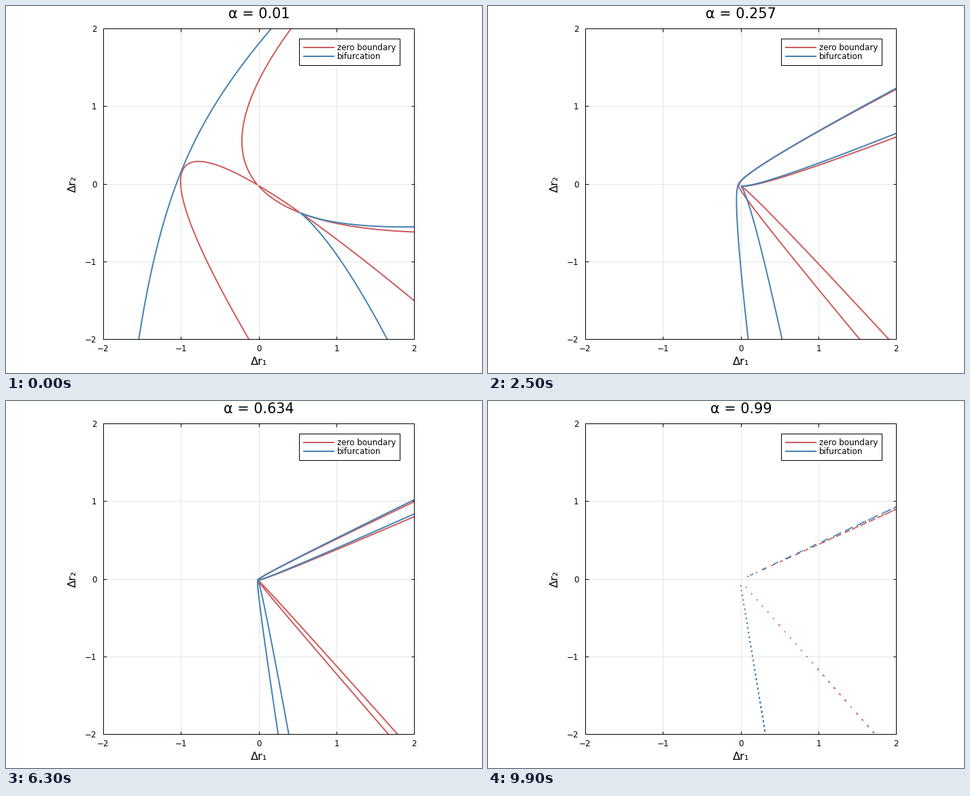
Animation of 700x540 px, one loop 10 s. Source, as a matplotlib script:

```python
import numpy as np
import matplotlib.pyplot as plt
from matplotlib.animation import FuncAnimation
from matplotlib.collections import LineCollection
from matplotlib.lines import Line2D
from matplotlib.patches import Rectangle

W, H, DPI = 700, 540, 100
FRAMES = 100
PX = 72 / DPI  # points per pixel
RED, BLUE = "indianred", "steelblue"

plt.rcParams["font.family"] = "DejaVu Sans"
plt.rcParams["path.simplify"] = False

# Growth rates r = (1 - a) A x + a Q(x): every curve scales with (1 - a)^2 / a
ORIGIN = (-0.0124, -0.0163)
axis = np.linspace(-2, 2, 401)
R1, R2 = np.meshgrid(axis - ORIGIN[0], axis - ORIGIN[1])

# Parabolas x2 = 0 and x1 = 0: (axis slope, linear term, quadratic term)
PARABOLAS = [(0.453, -0.6184, 45.94), (-1.1405, 1.8219, 81.92)]

# Fold curve, in coordinates along its two limiting rays
U = R1 + R2 / 6
V = 0.468 * R1 - R2
U0, V0 = 0.0186, 0.0214
M12, M21 = -0.10167, -0.1345
FOLD = (2 * M12 ** 2 * M21) ** 2


def zero_boundary(g):
    out = 1.0
    for slope, p, q in PARABOLAS:
        w = R2 - slope * R1
        out = out * (q / g * w * w + p * w - R1)
    return out


def bifurcation(g):
    """Discriminant of the quartic for the equilibria."""
    x = 4 * U / g + U0
    z = 4 * M12 ** 2 * (4 * V / g + V0)
    x2, z2 = x * x, z * z
    return x2 * z2 - z2 * z - 16 * FOLD * x2 * x + 18 * FOLD * x * z - 27 * FOLD ** 2


fig = plt.figure(figsize=(W / DPI, H / DPI), dpi=DPI, facecolor="white")


def label(x, y, text, size, **kw):
    return fig.text(x / W, 1 - y / H, text, fontsize=size * PX, **kw)


ax = fig.add_axes([143 / W, (H - 490.3) / H, 457.4 / W, 457.3 / H])
ax.set(xlim=(-2, 2), ylim=(-2, 2))
ax.set_autoscale_on(False)
ticks = range(-2, 3)
ax.set_xticks(ticks)
ax.set_yticks(ticks)
ax.set_axisbelow(True)
ax.grid(color="black", alpha=0.1, lw=PX)
ax.tick_params(direction="in", length=4.5 * PX, width=PX, top=True, right=True,
               labelsize=11.87 * PX)
ax.tick_params(axis="x", pad=7.4 * PX)
ax.tick_params(axis="y", pad=9.5 * PX)
for spine in ax.spines.values():
    spine.set_linewidth(PX)

title = label(372, 18, "", 20.75, ha="center", va="baseline")
label(372, 528.5, "Δr₁", 16.3, ha="center", va="baseline")
label(103, 262, "Δr₂", 16.3, ha="center", va="baseline", rotation=90,
      rotation_mode="anchor")

# Legend, laid out in pixels from the top left
legend = dict(transform=None, zorder=6)
ax.add_artist(Rectangle((431, H - 87), 148, 39, fc="white", ec="black",
                        lw=PX, **legend))
for y, color, name in [(61, RED, "zero boundary"), (74, BLUE, "bifurcation")]:
    ax.add_artist(Line2D([438, 482], [H - y, H - y], color=color, lw=2 * PX, **legend))
    label(487, y + 4.3, name, 11.87, va="baseline", zorder=7)

curves = [ax.add_collection(LineCollection([], colors=color, linewidths=2 * PX,
                                           capstyle="round", joinstyle="round"),
                            autolim=False)
          for color in (RED, BLUE)]


def zero_set(values):
    # Open polylines, so that even the tiniest loops show as dots
    cs = ax.contour(axis, axis, values, levels=[0])
    segments = cs.allsegs[0]
    cs.remove()
    return segments


def draw(i):
    a = 0.01 + 0.98 * i / (FRAMES - 1)
    g = (1 - a) ** 2 / a
    for curve, func in zip(curves, (zero_boundary, bifurcation)):
        curve.set_segments(zero_set(func(g)))
    title.set_text(f"α = {round(a, 3)}")
    return curves + [title]


anim = FuncAnimation(fig, draw, frames=FRAMES, interval=100,
                     init_func=lambda: [], repeat=True, repeat_delay=0)
plt.show()
```
